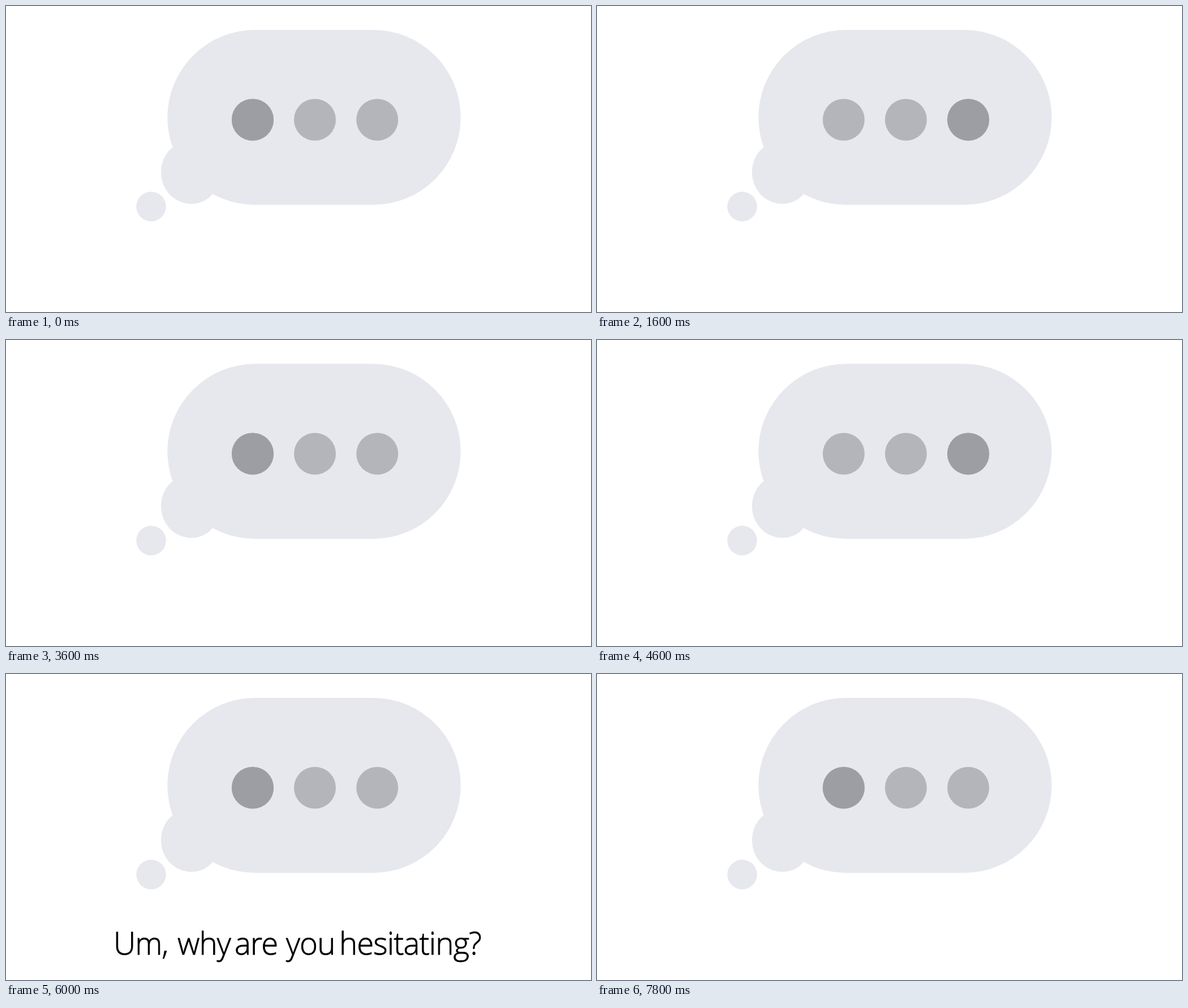
An HTML page that plays this animation: 1034x542 px, repeating every 8 s.

```html
<!DOCTYPE html>
<html lang="en">
<head>
<meta charset="utf-8">
<title>Typing bubble</title>
<style>
  html, body { margin: 0; width: 100%; height: 100%; overflow: hidden; background: #fff; }
  svg { display: block; width: 100%; height: 100%; }
  text {
    font: 300 54.5px "Open Sans", "Noto Sans", sans-serif;
    letter-spacing: -0.9px;
    fill: #000;
    stroke: #000;
    stroke-width: 0.8px;
  }
</style>
</head>
<body>
<svg viewBox="0 0 1034 542">
  <g fill="#e7e8ed">
    <rect x="285.3" y="42.3" width="518.4" height="310" rx="155"/>
    <path d="M294.5 250.5C282 260 274 276 274 294.5C274 325.5 298 350.5 328 350.5C343 350.5 356 344 365 333L400 300L330 240Z"/>
    <circle cx="256.6" cy="355.2" r="26.3"/>
  </g>
  <g fill="#b4b5ba">
    <circle cx="436" cy="201.5" r="37"/>
    <circle cx="546" cy="201.5" r="37"/>
    <circle cx="656.2" cy="201.5" r="37"/>
  </g>
  <circle id="active" cy="201.5" r="37.1" fill="#9d9ea3"/>
  <text y="497"><tspan x="187">Excellent!</tspan> <tspan x="425">You’re</tspan> <tspan x="578">responding.</tspan></text>
  <text y="497"><tspan x="190">Um,</tspan> <tspan x="303">why</tspan> <tspan x="404">are</tspan> <tspan x="495">you</tspan> <tspan x="589">hesitating?</tspan></text>
</svg>
<script>
  const LOOP = 8000, STEP = 200;
  const DOT_X = [436, 546, 656.2];
  const SHOWN = [[1800, 3600], [6000, 7800]];
  const active = document.getElementById("active");
  const captions = document.querySelectorAll("text");

  function draw(t) {
    active.setAttribute("cx", DOT_X[Math.floor(t / STEP) % DOT_X.length]);
    captions.forEach((caption, i) => {
      const [from, to] = SHOWN[i];
      caption.setAttribute("visibility", t >= from && t < to ? "visible" : "hidden");
    });
  }

  const start = performance.now();
  function tick() {
    draw((performance.now() - start) % LOOP);
    requestAnimationFrame(tick);
  }
  tick();
</script>
</body>
</html>
```
